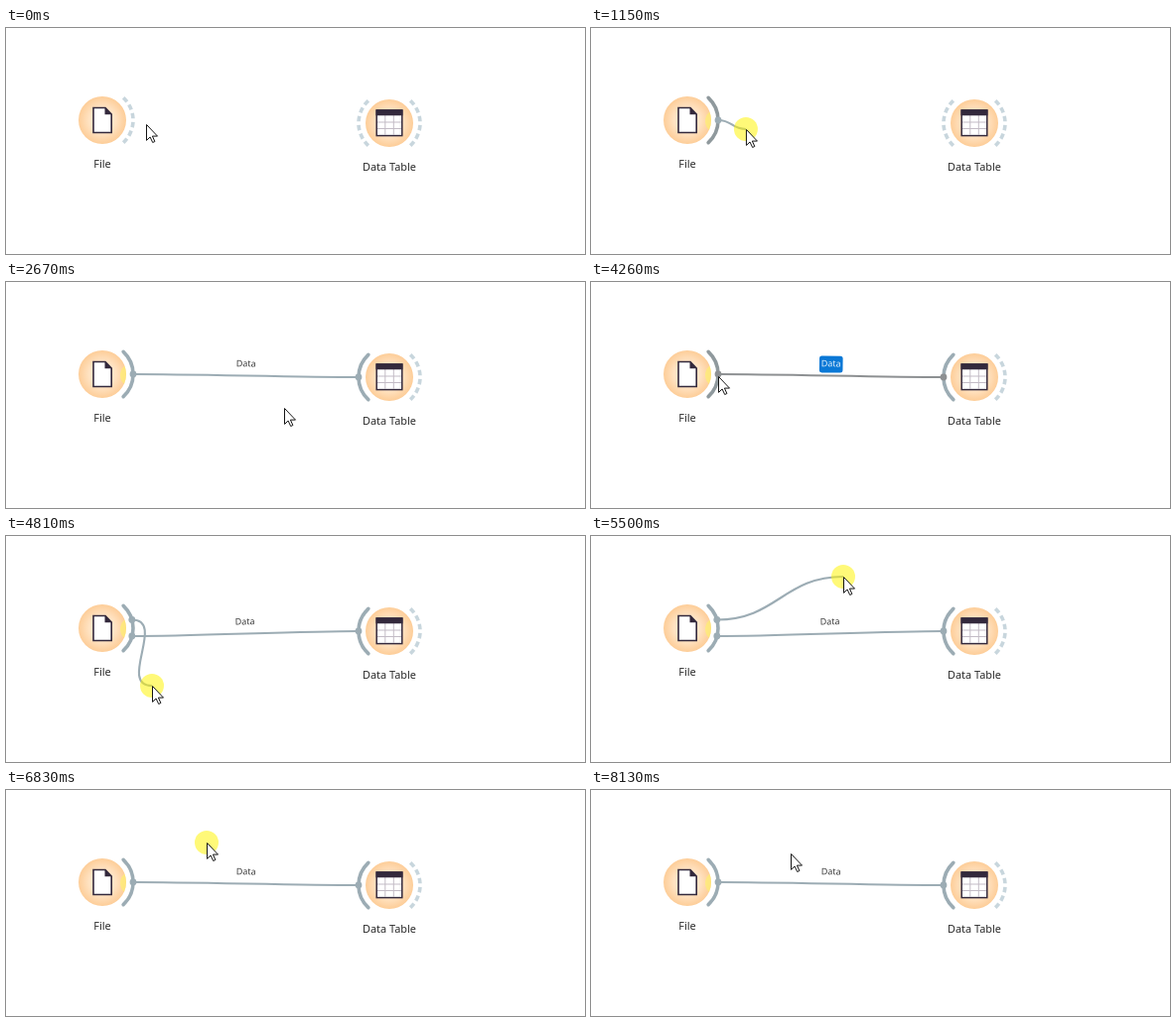
Write an HTML page that moves like this. It is 583 px wide and 228 px high and loops after 8260 ms.

```html
<!DOCTYPE html>
<html lang="en">
<head>
<meta charset="utf-8">
<title>Connecting widgets</title>
<style>
  html, body { margin: 0; width: 100%; height: 100%; overflow: hidden; background: #fff; }
  svg { display: block; width: 583px; height: 228px; }
  text { font-family: "Noto Sans", "Open Sans", sans-serif; text-anchor: middle; }
  .name { font-size: 10.9px; fill: #2b2b2b; }
  .wire { fill: none; stroke-width: 2.1; }
  .arc { fill: none; stroke-width: 3.6; }
</style>
</head>
<body>
<svg viewBox="0 0 583 228">
  <defs>
    <radialGradient id="skin">
      <stop offset="0" stop-color="#ffeedb"/>
      <stop offset=".55" stop-color="#ffe3c3"/>
      <stop offset="1" stop-color="#fdcd98"/>
    </radialGradient>
    <clipPath id="disc"><circle cx="97" cy="93" r="24"/></clipPath>
  </defs>

  <path id="link" class="wire"/>
  <path id="drag" class="wire" stroke="#9cacb4"/>
  <g id="label">
    <rect id="tag" x="-11.7" y="-20" width="23.6" height="17" rx="2.5" fill="#0a78d6"/>
    <text id="word" y="-9.2" font-size="9">Data</text>
  </g>

  <path id="fileArc" class="arc"/>
  <path id="tableArc" class="arc"/>
  <path id="outArc" class="arc"/>
  <circle id="dotA" r="3.4"/>
  <circle id="dotB" r="3.4"/>
  <circle id="dotC" r="3.4" fill="#9cacb4"/>

  <circle cx="97" cy="93" r="24" fill="url(#skin)"/>
  <circle id="glow" cx="127" cy="94" r="12" fill="#fff568" opacity=".6" clip-path="url(#disc)"/>
  <path d="M88 80.5H100L106.2 87V105.5H88Z" fill="#fff" stroke="#33293c" stroke-width="1.6"/>
  <path d="M99.5 80V87.2H106.6Z" fill="#33293c"/>
  <text class="name" x="97" y="141">File</text>

  <circle cx="386" cy="96" r="24" fill="url(#skin)"/>
  <rect x="373.2" y="83" width="25.6" height="25.6" fill="#fff" stroke="#33293c" stroke-width="1.5"/>
  <path d="M374 95H398M374 101.5H398M381.8 88V108M390.3 88V108" stroke="#c3bcc6" fill="none"/>
  <path d="M372.5 82.3H399.5V88.3H372.5Z" fill="#33293c"/>
  <text class="name" x="386" y="144">Data Table</text>

  <g id="menu">
    <path d="M221.5 230V40.5H437.5V230Z" fill="#f7f7f7" stroke="#c4c4c4"/>
    <path d="M253.5 41V230" stroke="#d6d6d6"/>
  </g>

  <circle id="press" r="12" fill="#fff400" opacity=".53"/>
  <path id="cursor" d="M.5 .5V16.4L4.1 13L6.7 18.5L8.9 17.5L6.4 12.1H11.5Z" fill="#fff" stroke="#151515" stroke-width="1"/>
</svg>
<script>
const LOOP = 8260;
const BLUE = '#9cacb4', GRAY = '#8d9092', PALE = '#c8d6dd';
const $ = id => document.getElementById(id);

// Bursts of screen updates: start, end, count
const bursts = [
  [330, 670, 5], [1020, 1840, 13], [1910, 1980, 2], [2250, 3020, 12],
  [3090, 3090, 1], [3570, 3920, 6], [4120, 4810, 11], [5010, 5500, 8],
  [6360, 6360, 1], [6630, 7320, 11], [8130, 8130, 1]
];

// Cursor path: time, x, y, and 1 when the move eases in and out
const path = [
  [0, 141, 97], [262, 141, 97], [670, 127, 94, 1], [1020, 127, 94],
  [1157, 156, 102], [1400, 215, 109], [1500, 252, 111], [1700, 325, 106],
  [1840, 350, 101], [1980, 358, 101], [2180, 358, 101], [2530, 304, 129],
  [2670, 280, 127], [3020, 250, 96], [3090, 247, 94], [3640, 247, 94],
  [3920, 128, 97, 1], [4050, 128, 97], [4258, 128, 95], [4320, 128, 96],
  [4810, 147, 151, 1], [4940, 147, 151], [5500, 254, 41, 1],
  [6560, 254, 41], [6837, 202, 53], [6970, 202, 53], [7320, 201, 64]
];

function snap(t) {
  let s = 0;
  for (const [a, b, n] of bursts) {
    if (t < a) break;
    const step = n > 1 ? (b - a) / (n - 1) : 1;
    s = Math.min(b, a + Math.floor((t - a) / step + .15) * step);
  }
  return s;
}

function cursorAt(t) {
  const i = path.findIndex(p => p[0] > t);
  if (i < 0) return path[path.length - 1].slice(1, 3);
  const [t0, x0, y0] = path[i - 1], [t1, x1, y1, ease] = path[i];
  let u = (t - t0) / (t1 - t0);
  if (ease) u = u * u * (3 - 2 * u);
  return [x0 + (x1 - x0) * u, y0 + (y1 - y0) * u];
}

function set(id, attrs) {
  for (const k in attrs) $(id).setAttribute(k, attrs[k]);
}

function show(id, on) {
  $(id).style.display = on ? '' : 'none';
}

function curve([x0, y0], [x1, y1]) {
  const c = Math.min(Math.hypot(x1 - x0, y1 - y0) / 2, 60);
  return `M${x0} ${y0}C${x0 + c} ${y0} ${x1 - c} ${y1} ${x1} ${y1}`;
}

function arc(id, cx, cy, side) {
  const r = 31, a = .82, dx = side * r * Math.cos(a), dy = r * Math.sin(a);
  set(id, { d: `M${cx + dx} ${cy - dy}A${r} ${r} 0 0 ${side > 0 ? 1 : 0} ${cx + dx} ${cy + dy}` });
}

function styleArc(id, solid, color) {
  set(id, { stroke: solid ? color : PALE, 'stroke-dasharray': solid ? 'none' : '5.5 3.57',
            'stroke-linecap': solid ? 'round' : 'butt' });
}

function dot(id, on, [x, y], color) {
  show(id, on);
  set(id, { cx: x, cy: y, fill: color });
}

function render(time) {
  const t = snap(time % LOOP);
  const within = (a, b) => t >= a && t < b;
  const [x, y] = cursorAt(t);

  const first = within(1050, 2250);
  const second = within(4300, 6800);
  const linked = t >= 2250;
  const hover = within(3000, 4300);
  const color = hover ? GRAY : BLUE;
  const sink = [355, 96];
  const start = second ? [126.8, 101] : [128, 93];

  show('link', first || linked);
  const end = linked || x >= 345 ? sink : [x, y];
  set('link', { d: curve(start, end), stroke: color });

  show('drag', second);
  if (second) set('drag', { d: curve([126.8, 84.5], cursorAt(Math.min(t, 5500))) });

  show('label', linked);
  const angle = Math.atan2(sink[1] - start[1], sink[0] - start[0]) * 180 / Math.PI;
  set('label', { transform: `translate(${(start[0] + sink[0]) / 2} ${(start[1] + sink[1]) / 2}) rotate(${angle})` });
  const selected = within(3570, 4300);
  show('tag', selected);
  set('word', { fill: selected ? '#e4f1fc' : '#3a3a3a' });

  const overFile = within(530, 1400) || within(3840, 4300);
  styleArc('fileArc', t >= 530, overFile ? '#8f999d' : BLUE);
  styleArc('tableArc', t >= 1760, BLUE);
  dot('dotA', first || linked, start, color);
  dot('dotB', t >= 1760, sink, color);
  dot('dotC', second, [126.8, 84.5], BLUE);

  show('glow', t >= 1050);
  show('menu', within(6360, 6800));
  show('press', within(1020, 2250) || within(3570, 3700) || within(4300, 6360) || within(6760, 6970));
  set('press', { cx: x, cy: y });
  set('cursor', { transform: `translate(${x} ${y})` });
}

arc('fileArc', 97, 93, 1);
arc('tableArc', 386, 96, -1);
arc('outArc', 386, 96, 1);
styleArc('outArc', false);

const begin = performance.now();
function tick() {
  render(performance.now() - begin);
  requestAnimationFrame(tick);
}
tick();
</script>
</body>
</html>
```
